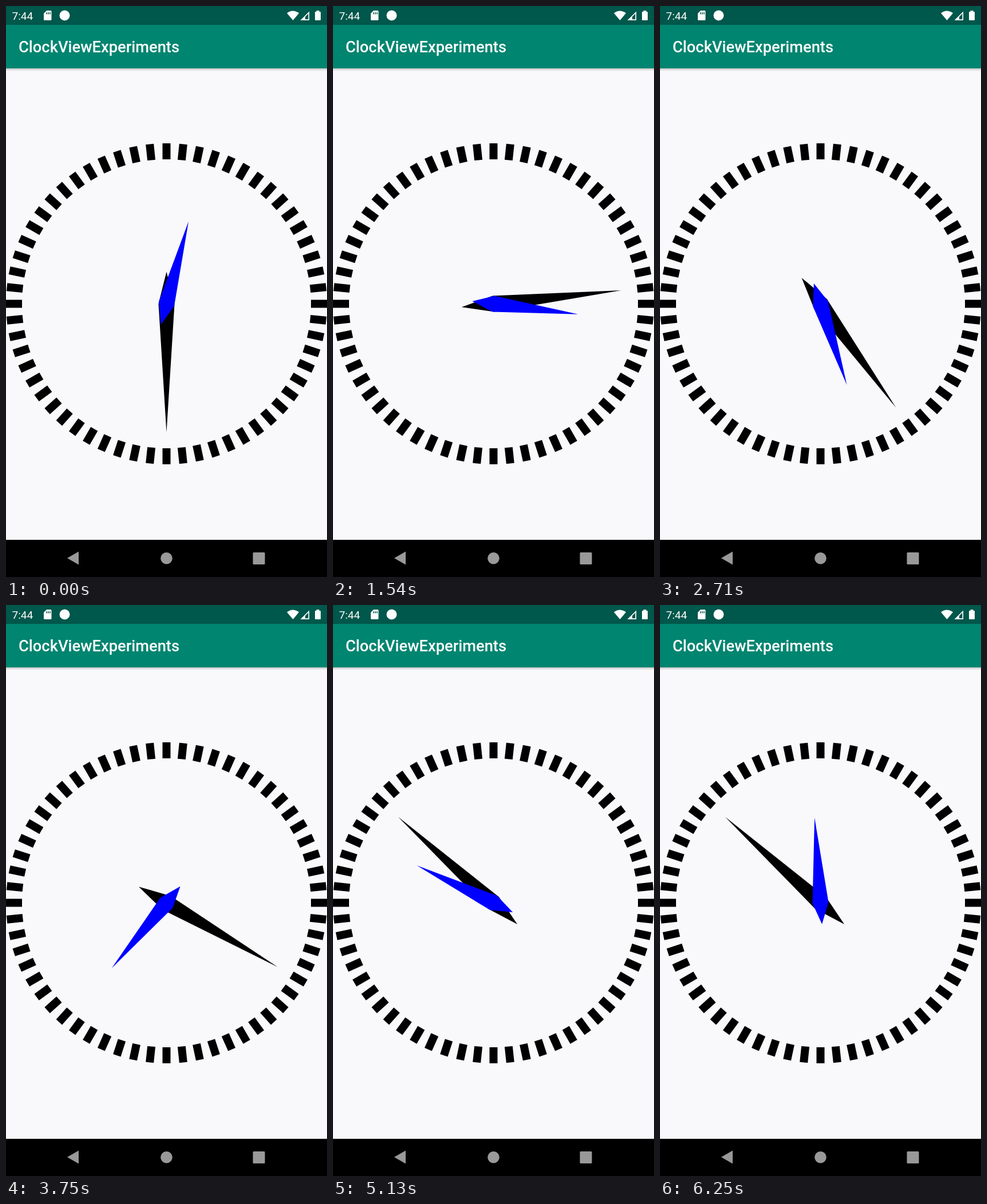
Recreate the animation shown at these times as an HTML page. Size 561x998 px, loop 6290 ms.

```html
<!DOCTYPE html>
<html lang="en">
<head>
<meta charset="utf-8">
<title>Clock</title>
<style>
  html, body { margin: 0; width: 100%; height: 100%; overflow: hidden; background: #f9f9fb; }
  svg { display: block; width: 561px; height: 998px; font-family: Roboto, sans-serif; }
</style>
</head>
<body>
<svg viewBox="0 0 561 998">
  <defs>
    <linearGradient id="shadow" x2="0" y2="1">
      <stop stop-opacity=".2"/>
      <stop offset="1" stop-opacity="0"/>
    </linearGradient>
  </defs>

  <rect width="561" height="998" fill="#f9f9fb"/>
  <rect y="109" width="561" height="5" fill="url(#shadow)"/>
  <rect y="33" width="561" height="76" fill="#008570"/>
  <rect width="561" height="33" fill="#00574b"/>

  <g fill="#fff">
    <text x="22" y="81" font-size="27.3" font-weight="500">ClockViewExperiments</text>
    <text x="10.5" y="24" font-size="19.1">7:44</text>
    <path d="M71 8H78Q79.500 8 79.500 9.500V23.500Q79.500 25 78 25H67.500Q66 25 66 23.500V13Z"/>
    <path d="M71 11v3.500M74 11v3.500M77 11v3.500" stroke="#00574b" stroke-width="1.500"/>
    <circle cx="102.500" cy="16.500" r="9"/>
    <path d="M491 12.500Q501.500 4.500 512 12.500L501.500 25Z"/>
    <path d="M516.500 24.200H529.200V11.500Z" fill="none" stroke="#fff" stroke-width="1.700"/>
    <path d="M516 24.500L523 17.500V24.500Z"/>
    <path d="M542.500 8h5v2h1.500q1 0 1 1v13q0 1-1 1h-8q-1 0-1-1v-13q0-1 1-1h1.500z"/>
  </g>

  <g transform="translate(280.5 520.5)">
    <g id="ticks"></g>
    <path id="minute" d="M0-224.400L14 0L0 56L-14 0Z"/>
    <path id="hour" d="M0-149L14 0L0 37.400L-14 0Z" fill="#00f"/>
  </g>

  <rect y="933" width="561" height="65"/>
  <g fill="#999">
    <path d="M107 965L127 953.500V976.500Z"/>
    <circle cx="280.500" cy="965.300" r="10.300"/>
    <rect x="431.500" y="955" width="21" height="21" rx="1.500"/>
  </g>
</svg>
<script>
  const LOOP = 6290, FRAME = 1000 / 24, LAST = 150;
  // [frame, minutes past twelve]: the clock's pace drifts slightly
  const pace = [[0, 30], [21, 122], [37, 194], [65, 324], [90, 440], [123, 592], [LAST, 712]];
  const $ = id => document.getElementById(id);
  const turn = (id, angle) => $(id).setAttribute('transform', `rotate(${angle})`);

  $('ticks').innerHTML = Array.from({ length: 60 }, (_, i) =>
    `<rect x="-7" y="-280.5" width="14" height="28" transform="rotate(${i * 6})"/>`).join('');

  function minutesAt(frame) {
    const i = pace.findIndex(([end], k) => k && frame <= end);
    const [f0, m0] = pace[i - 1], [f1, m1] = pace[i];
    const minutes = m0 + (m1 - m0) * (frame - f0) / (f1 - f0);
    return 2 * Math.round(minutes / 2);
  }

  function draw() {
    const time = performance.now() % LOOP;
    const minutes = minutesAt(Math.min(LAST, Math.floor((time + 5) / FRAME)));
    turn('minute', minutes * 6);
    turn('hour', minutes / 2);
    requestAnimationFrame(draw);
  }
  draw();
</script>
</body>
</html>
```
